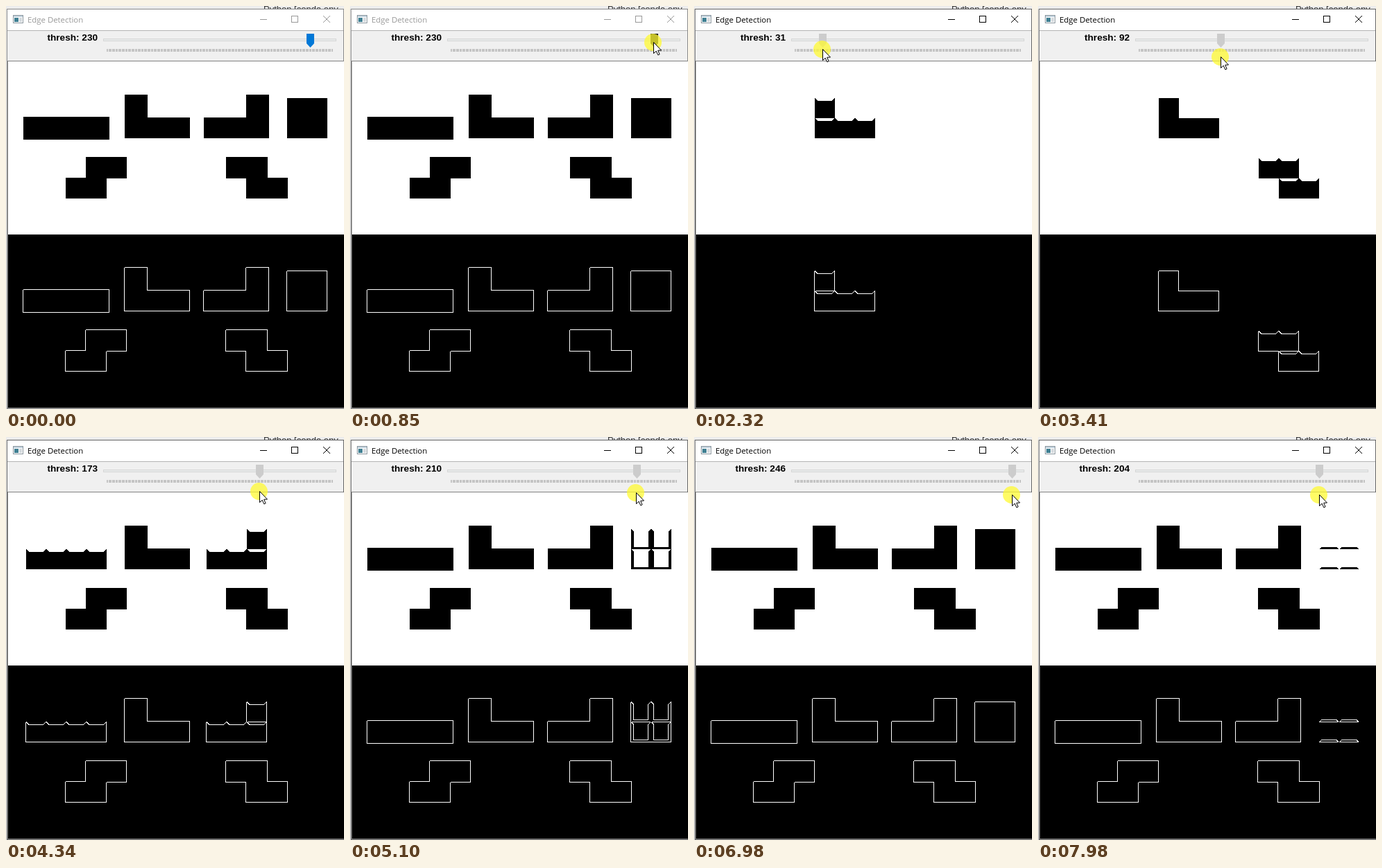
Write an HTML page with a canvas that moves like this. It is 487x582 px and loops after 8000 ms.

```html
<!DOCTYPE html>
<html lang="en">
<head>
<meta charset="utf-8">
<title>Edge Detection</title>
<style>
html, body { margin: 0; width: 100%; height: 100%; overflow: hidden; background: #eee; }
canvas { display: block; width: 487px; height: 582px; }
</style>
</head>
<body>
<canvas id="stage" width="487" height="582"></canvas>
<script>
const ctx = document.getElementById('stage').getContext('2d');
const LOOP = 8000, STEP = 77;
const W = 484, H = 250, LEFT = 3, TOP = 80, TILE = 29;

// ---- grey picture of the blocks, thresholded on every repaint ----
const gray = new Uint8Array(W * H).fill(255);

function fill(x0, y0, x1, y1, shade) {
  for (let y = y0; y < y1; y++)
    for (let x = x0; x < x1; x++) {
      const v = shade(x, y);
      if (v !== undefined) gray[(y - TOP) * W + x - LEFT] = v;
    }
}

let seed = 7;
function random() {
  seed = (seed * 16807) % 2147483647;
  return seed / 2147483647;
}

// Faint compression specks, denser above and below than at the sides
function speckle(x0, y0, x1, y1) {
  fill(x0 - 3, y0 - 4, x1 + 3, y1 + 4, (x, y) => {
    const chance = y < y0 || y >= y1 ? 0.17 : 0.05;
    return random() < chance ? 250 + Math.floor(random() * 4) : undefined;
  });
}

// Bevelled tile: lighter top, darker sides, darkest bottom
function tile(x0, y0, { face, top, lip = 4, dim = 0.1 }) {
  const last = TILE - 1;
  fill(x0, y0, x0 + TILE, y0 + TILE, (x, y) => {
    const i = x - x0, j = y - y0;
    const up = j / lip, side = Math.min(i, last - i) / 4, low = (last - j) / 3;
    const d = Math.min(up, side, low);
    if (d >= 1) return face;
    return d === side ? face * (1 - dim) : d === up ? top : face * (1 - 3 * dim);
  });
}

// pad: how far the blurred rim reaches out to the left, top, right, bottom
const pieces = [
  { x: 29, y: 162, rows: ['XXXX'], pad: [4, 2, 4, 2], face: 169, top: 185, rim: 195 },
  { x: 174, y: 133, rows: ['X..', 'XXX'], pad: [3, 5, 4, 0], face: 14, top: 60, rim: 130 },
  { x: 289, y: 133, rows: ['..X', 'XXX'], pad: [4, 5, 3, 0], face: 168, top: 185, rim: 195 },
  { x: 405, y: 133, rows: ['XX', 'XX'], pad: [0, 0, 0, 0], face: 213, top: 217, rim: 226, dim: 0.02 },
  { x: 86, y: 220, rows: ['.XX', 'XX.'], pad: [0, 2, 1, 0], face: 135, top: 168, rim: 150, lip: 2 },
  { x: 318, y: 220, rows: ['XX.', '.XX'], pad: [1, 2, 1, 0], face: 75, top: 115, rim: 130 }
];

function drawPiece(p) {
  const tiles = [], rims = [];
  p.rows.forEach((row, r) => [...row].forEach((cell, c) => {
    if (cell !== 'X') return;
    const x = p.x + c * TILE, y = p.y + r * TILE;
    const outer = [c === 0, r === 0, c === row.length - 1, r === p.rows.length - 1];
    const [l, t, rt, b] = p.pad.map((n, i) => outer[i] ? n : Math.min(n, 1));
    tiles.push([x, y]);
    rims.push([x - l, y - t, x + TILE + rt, y + TILE + b]);
  }));
  rims.forEach(r => speckle(...r));
  rims.forEach(r => fill(...r, () => p.rim));
  tiles.forEach(t => tile(...t, p));
}
pieces.forEach(drawPiece);

const picture = ctx.createImageData(W, 2 * H);
const pixels = new Uint32Array(picture.data.buffer);
const BLACK = 0xff000000, WHITE = 0xffffffff;

function drawPicture(thresh) {
  const on = i => gray[i] > thresh;
  for (let y = 0, i = 0; y < H; y++)
    for (let x = 0; x < W; x++, i++) {
      const v = on(i);
      const edge = (x < W - 1 && v !== on(i + 1)) || (y < H - 1 && v !== on(i + W));
      pixels[i] = v ? WHITE : BLACK;
      pixels[i + W * H] = edge ? WHITE : BLACK;
    }
  ctx.putImageData(picture, LEFT, TOP);
}

// ---- motion: [time, threshold]; equal neighbours are a pause ----
const keys = [
  [0, 230], [1240, 230], [1550, 164], [2320, 31], [2560, 20], [2800, 20],
  [3410, 92], [4340, 173], [5410, 230], [6130, 230], [6340, 253], [6490, 259],
  [6903, 259], [6980, 246], [7520, 207], [7900, 207], [7980, 204], [LOOP, 204]
];

const snap = t => Math.floor(t / STEP) * STEP;
const thumbX = thresh => 145.6 + 1.271 * thresh;

function entry(t) {
  if (t < 150) return null;
  const u = Math.min(1, snap(t - 150) / 693), p = 1 - (1 - u) ** 2;
  return [331 + 106 * p, 525 - 473 * p];
}

function stateAt(t) {
  if (t < 1090) return { thresh: 230, active: false, pointer: entry(t) };
  const i = keys.findIndex(k => k[0] > t);
  const [t0, v0] = keys[i - 1], [t1, v1] = keys[i];
  const held = v0 === v1 ? 0 : snap(t - t0);
  const v = v0 + (v1 - v0) * held / (t1 - t0);
  const sink = Math.exp(-Math.max(0, t0 + held - 1550) / 1650);
  return {
    thresh: Math.min(255, Math.round(v)),
    active: true,
    pointer: [Math.round(thumbX(v)), Math.round(84 - 35 * sink)]
  };
}

// ---- window ----
function box(x, y, w, h, color) {
  ctx.fillStyle = color;
  ctx.fillRect(x, y, w, h);
}

function poly(points, color) {
  ctx.beginPath();
  points.forEach(([x, y]) => ctx.lineTo(x, y));
  ctx.closePath();
  ctx.fillStyle = color;
  ctx.fill();
}

function label(text, x, y, font, color, align = 'left') {
  ctx.font = font;
  ctx.textAlign = align;
  ctx.fillStyle = color;
  ctx.fillText(text, x, y);
}

function drawWindow(active) {
  box(0, 0, 487, 582, '#ececec');
  label('Python [conda env', 371, 9, '13px "Liberation Sans", Arial, sans-serif', '#333');
  box(1, 4, 486, 578, active ? '#666' : '#8a8a8a');
  box(2, 5, 484, 30, '#fff');
  box(2, 35, 484, 1, '#b4b4b4');
  box(2, 36, 484, 43, '#f0f0f0');
  box(2, 79, 484, 502, '#828282');

  box(10, 13, 15, 12, '#8c979f');
  box(11, 14, 13, 2, '#c3d3de');
  box(11, 16, 13, 8, '#fff');
  box(12, 17, 6, 6, '#3f7f92');
  box(19, 17, 4, 6, '#d5dade');

  const ink = active ? '#000' : '#999';
  label('Edge Detection', 31, 24, '11.4px "Open Sans", "Noto Sans", sans-serif', ink);
  box(366, 19, 10, 1, ink);
  ctx.strokeStyle = ink;
  ctx.lineWidth = 1;
  ctx.strokeRect(411.5, 14.5, 9, 9);
  ctx.beginPath();
  ctx.moveTo(457, 14); ctx.lineTo(467, 24);
  ctx.moveTo(467, 14); ctx.lineTo(457, 24);
  ctx.stroke();
}

function drawSlider({ thresh, active, pointer }) {
  label('thresh: ' + thresh, 132, 50, 'bold 13.6px "Liberation Sans", Arial, sans-serif', '#000', 'right');
  box(140, 47, 336, 4, '#d6d6d6');
  box(141, 48, 334, 2, '#e7eaea');
  for (let i = 0; i < 256; i++) box(Math.round(145 + i * 1.274), 62, 1, 4, '#c4c4c4');

  const x = Math.round(thumbX(thresh)) - 5;
  const hover = pointer && pointer[1] < 60;
  poly([[x, 40], [x + 11, 40], [x + 11, 54], [x + 5.5, 60], [x, 54]],
    active ? '#ccc' : hover ? '#171717' : '#0078d7');
}

function drawPointer([x, y]) {
  ctx.beginPath();
  ctx.arc(x - 0.5, y + 0.5, 12.5, 0, 2 * Math.PI);
  ctx.fillStyle = 'rgba(255, 250, 50, 0.75)';
  ctx.fill();
  const arrow = [[0, 0], [0, 16], [3.7, 12.6], [6.3, 18.3], [8.6, 17.3], [6.2, 11.7], [11, 11.5]];
  poly(arrow.map(([dx, dy]) => [x + 0.5 + dx, y + 0.5 + dy]), '#fff');
  ctx.strokeStyle = '#000';
  ctx.stroke();
}

function frame(now) {
  const state = stateAt(now % LOOP);
  drawWindow(state.active);
  drawSlider(state);
  drawPicture(state.thresh);
  if (state.pointer) drawPointer(state.pointer);
  requestAnimationFrame(frame);
}
frame(0);
</script>
</body>
</html>
```
